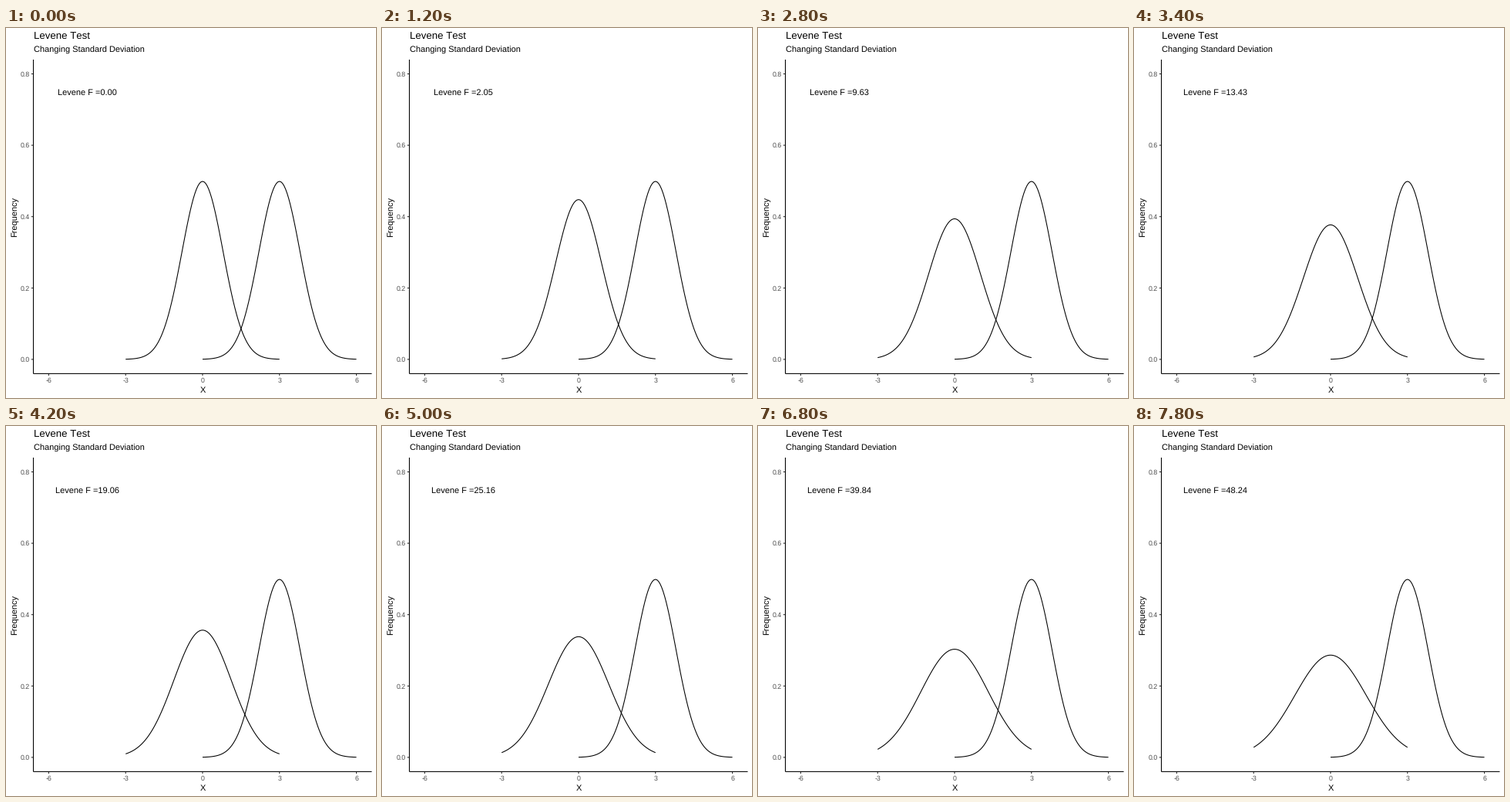
A matplotlib script that plays this animation: 480x480 px, repeating every 8 s.

```python
import numpy as np
import matplotlib.pyplot as plt
from matplotlib.animation import FuncAnimation

plt.rcParams.update({
    "font.family": "Liberation Sans",
    "text.hinting": "none",
    "text.kerning_factor": 6,
})

SIZE, DPI = 480, 72
FRAMES, INTERVAL = 40, 200
LEFT, RIGHT, TOP, BOTTOM = 35.5, 474.5, 41.0, 448.4
LINE = 1.07
BASE_SD = 0.8
SD_STEP = 1.2 / 79
F_SCALE = 354.49


def px(x):
    return LEFT + (x + 6.6) / 13.2 * (RIGHT - LEFT)


def py(y):
    return BOTTOM - (y + 0.04) / 0.88 * (BOTTOM - TOP)


def normal(x, mean, sd):
    return np.exp(-((x - mean) / sd) ** 2 / 2) / (sd * np.sqrt(2 * np.pi))


def levene(sd):
    ratio = sd / BASE_SD
    return F_SCALE * (ratio - 1) ** 2 / (ratio ** 2 + 1)


fig = plt.figure(figsize=(SIZE / DPI, SIZE / DPI), dpi=DPI, facecolor="white")
ax = fig.add_axes([0, 0, 1, 1])
ax.set(xlim=(0, SIZE), ylim=(SIZE, 0))
ax.axis("off")


def stroke(xs, ys, color="black", z=2):
    return ax.plot(xs, ys, color=color, lw=LINE, snap=False, zorder=z,
                   solid_capstyle="butt", solid_joinstyle="round")[0]


def label(x, y, text, size=11, color="black", ha="center", **kw):
    return ax.text(x, y, text, fontsize=size, color=color, ha=ha,
                   va="baseline", **kw)


# Axes, ticks and titles
stroke([LEFT, LEFT], [TOP, BOTTOM], z=3)
stroke([LEFT, RIGHT], [BOTTOM, BOTTOM], z=3)
for v in (-6, -3, 0, 3, 6):
    stroke([px(v)] * 2, [BOTTOM, BOTTOM + 2.75], "#333333")
    label(px(v), 460, str(v), 8.8, "#4d4d4d")
for v in (0.0, 0.2, 0.4, 0.6, 0.8):
    stroke([LEFT - 2.75, LEFT], [py(v)] * 2, "#333333")
    label(LEFT - 4.95, py(v) + 3.2, f"{v:.1f}", 8.8, "#4d4d4d", "right")

label(LEFT, 15, "Levene Test", 13.2, ha="left")
label(LEFT, 32, "Changing Standard Deviation", ha="left")
label(px(0), 473, "X")
label(13.4, (TOP + BOTTOM) / 2, "Frequency", rotation=90,
      rotation_mode="anchor")

# Curves and the statistic
xs = np.linspace(-3, 3, 101)
curve = stroke(px(xs), py(normal(xs, 0, BASE_SD)))
stroke(px(xs + 3), py(normal(xs + 3, 3, BASE_SD)))
stat = label(px(-4.5), 87, "", 11.04)


def update(i):
    sd = BASE_SD + SD_STEP * i
    curve.set_ydata(py(normal(xs, 0, sd)))
    stat.set_text(f"Levene F ={levene(sd):.2f}")
    return curve, stat


anim = FuncAnimation(fig, update, frames=FRAMES, interval=INTERVAL,
                     init_func=lambda: update(0), repeat=True, repeat_delay=0)
plt.show()
```
